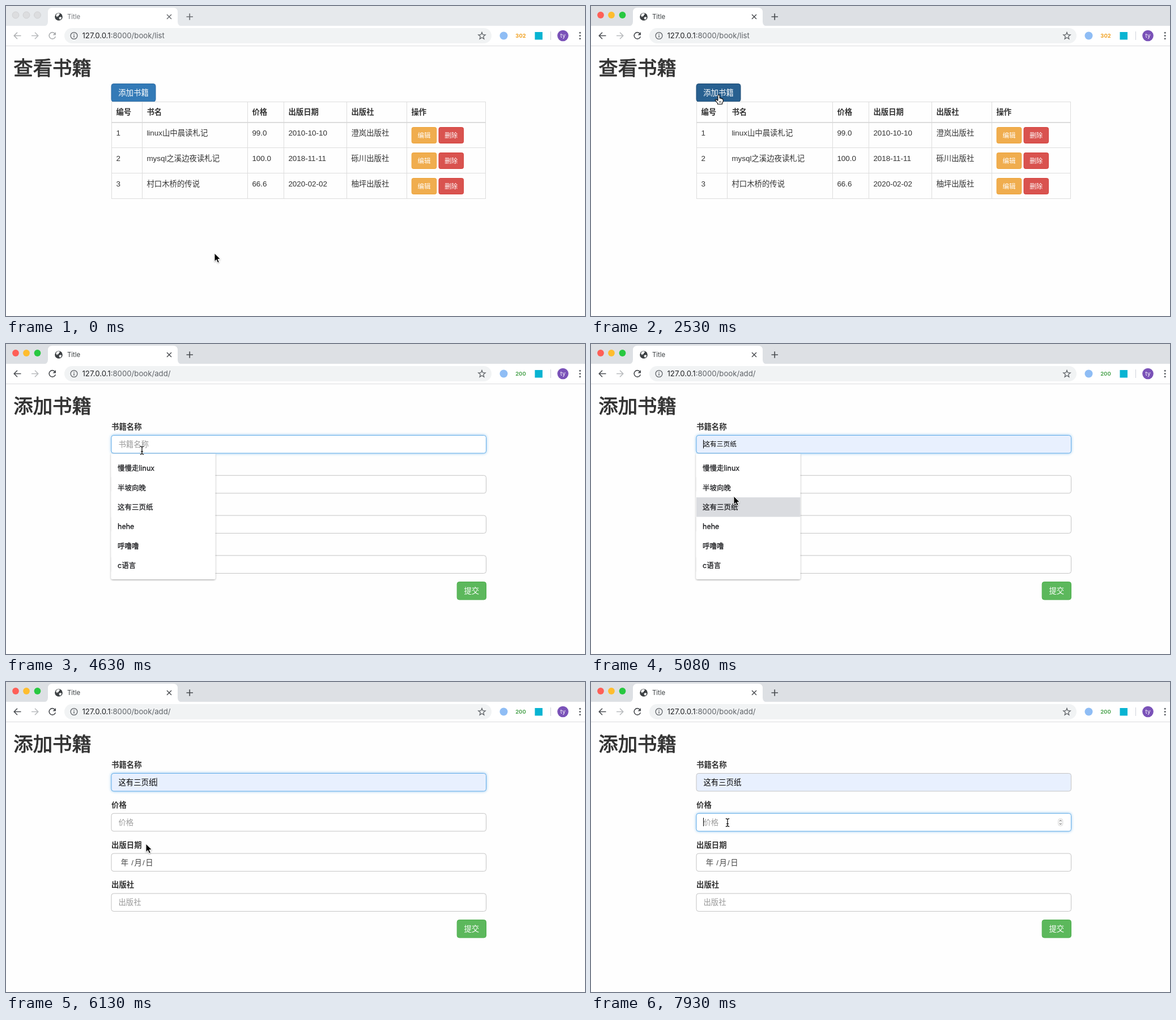
Write an HTML page that moves like this. It is 1022x548 px and loops after 8000 ms.

```html
<!DOCTYPE html>
<html lang="zh">
<head>
<meta charset="utf-8">
<title>Title</title>
<style>
html, body { margin: 0; width: 100%; height: 100%; overflow: hidden; background: #fefefe; }
svg { display: block; width: 100%; height: 100%; }
text { white-space: pre; font-family: "Liberation Sans", "Noto Sans CJK SC", "Noto Sans CJK", sans-serif; }
.ui { font-family: Inter, "Noto Sans CJK SC", "Noto Sans CJK", sans-serif; }
.bold { font-weight: 700; }
.medium { stroke: currentColor; stroke-linejoin: round; }
</style>
</head>
<body>
<svg id="stage" viewBox="0 0 1022 548" preserveAspectRatio="none"></svg>
<script>
const LOOP = 8000;
const BOOK = '这有三页纸';
const OPTIONS = ['慢慢走linux', '半坡向晚', BOOK, 'hehe', '呼噜噜', 'c语言'];
const ROW_H = 34.45, ROW_TOP = 202.2;

// ---- markup helpers ----
const text = (x, cy, str, size = 13.4, fill = '#333', attrs = '') =>
  `<text x="${x}" y="${cy + size * 0.37}" font-size="${size}" fill="${fill}" ${attrs}>${str}</text>`;
const rect = (x, y, w, h, fill, attrs = '') =>
  `<rect x="${x}" y="${y}" width="${w}" height="${h}" fill="${fill}" ${attrs}/>`;
const circle = (x, y, r, fill, attrs = '') =>
  `<circle cx="${x}" cy="${y}" r="${r}" fill="${fill}" ${attrs}/>`;
const line = (d, stroke, w = 1, attrs = '') =>
  `<path d="${d}" fill="none" stroke="${stroke}" stroke-width="${w}" ${attrs}/>`;
const group = (id, body, attrs = '') => `<g id="${id}" ${attrs}>${body}</g>`;
const button = (x, y, w, h, fill, edge, label, size, r, id = '') =>
  rect(x + .5, y + .5, w - 1, h - 1, fill, `stroke="${edge}" rx="${r}" ${id && `id="${id}"`}`) +
  text(x + w / 2, y + h / 2, label, size, '#fff', 'text-anchor="middle"');
const heading = str =>
  text(13.3, 109, str, 34.4, '#333', 'class="medium" color="#333" stroke-width=".95"');

// ---- browser window ----
function chrome() {
  const lights = [17, 36, 55.5].map((x, i) => circle(x, 16, 5.9, '#ddd', `id="light${i}"`)).join('');
  const tab = `<path d="M66 35.5Q74 35.5 74 27.5V11Q74 3 82 3H295Q303 3 303 11V27.5Q303 35.5 311 35.5Z" fill="#fff"/>`;
  const globe = circle(93, 19, 6.8, '#3c4043') +
    `<path d="M88 16q3-4 6-3l1 2-2 1v2h-2l-1 2zM93 21l3-2 2 1q0 3-3 4l-1-2z" fill="#fff"/>`;
  const star = Array.from({ length: 10 }, (_, i) => {
    const a = i * Math.PI / 5 - Math.PI / 2, r = i % 2 ? 2.8 : 6.5;
    return (840 + r * Math.cos(a)).toFixed(2) + ',' + (53 + r * Math.sin(a)).toFixed(2);
  }).join(' ');
  return rect(0, 0, 1022, 36, '#dee1e6', 'id="strip"') + lights + tab + globe +
    text(108, 19, 'Title', 11.4, '#333', 'class="ui" id="tabTitle"') +
    rect(0, 35, 1022, 35, '#fff') + rect(0, 70, 1022, 1, '#dcdcde') +
    group('tools',
      line('M284 15l8 8m0-8l-8 8', 'currentColor', 1.5) +
      line('M318.5 19h11.5M324.2 13.3v11.5', 'currentColor', 1.7) +
      line('M26.5 52.5H14.5M20 46.8l-5.7 5.7 5.7 5.7', 'currentColor', 1.6) +
      line('M86.3 48.8A5.7 5.7 0 1 0 87.3 54', 'currentColor', 1.6) +
      '<path d="M88 46v5.6h-5.6z" fill="currentColor"/>') +
    line('M45 52.5H56.5M51 46.8l5.7 5.7-5.7 5.7', '#b9bbbe', 1.6) +
    rect(103, 39, 754, 27, '#f1f3f4', 'rx="13.5"') +
    circle(120, 52.5, 5.9, 'none', 'stroke="#5f6368" stroke-width="1.3"') +
    line('M120 51.7v4M120 49v1.5', '#5f6368', 1.4) +
    `<text class="ui" x="134.5" y="57.3" font-size="13.2" fill="#5f6368"><tspan fill="#202124">127.0.0.1</tspan>:8000/book/<tspan id="path">list</tspan></text>` +
    `<polygon points="${star}" fill="none" stroke="#5f6368" stroke-width="1.3"/>` +
    circle(878.5, 52.5, 7, '#8fbdf5') +
    text(908.5, 52.5, '302', 9.4, '#f0a020', 'class="ui bold" text-anchor="middle" id="code"') +
    rect(933.5, 46, 13.5, 13.5, '#08b4d2') +
    rect(961, 45, 1, 15, '#cfd3da') +
    circle(983, 52.5, 9.8, '#7a52b8') +
    text(983, 52.2, 'ty', 10, '#fff', 'class="ui" text-anchor="middle"') +
    [47.2, 52.5, 57.8].map(y => circle(1013.2, y, 1.5, '#5f6368')).join('');
}

// ---- book list ----
function listPage() {
  const cols = [186, 240, 426, 490, 601, 707, 846];
  const cells = (row, cy, attrs = '') =>
    row.map((s, i) => text(cols[i] + 8.4, cy, s, 13.4, '#333', attrs)).join('');
  const rows = [
    ['1', 'linux山中晨读札记', '99.0', '2010-10-10', '澄岚出版社'],
    ['2', 'mysql之溪边夜读札记', '100.0', '2018-11-11', '砾川出版社'],
    ['3', '村口木桥的传说', '66.6', '2020-02-02', '柚坪出版社']
  ];
  const body = rows.map((row, i) => {
    const y = 206 + i * 45;
    return cells(row, y + 18.2) +
      button(715.7, y + 8, 44.6, 29, '#f0ad4e', '#eea236', '编辑', 11.5, 3) +
      button(763.5, y + 8, 44.6, 29, '#d9534f', '#d43f3a', '删除', 11.5, 3);
  }).join('');
  return heading('查看书籍') +
    button(185.5, 137, 79, 32.5, '#337ab7', '#2e6da4', '添加书籍', 13.4, 4, 'addBtn') +
    cols.map(x => rect(x, 169, 1, 172, '#ddd')).join('') +
    [169, 250, 295, 340].map(y => rect(186, y, 661, 1, '#ddd')).join('') +
    rect(186, 205, 661, 1.8, '#d9d9d9') +
    cells(['编号', '书名', '价格', '出版日期', '出版社', '操作'], 187.5, 'class="bold"') + body;
}

// ---- add form ----
function formPage() {
  const names = ['书籍名称', '价格', '出版日期', '出版社'];
  const fields = names.map((name, i) => {
    const y = 161 + i * 70.8, cy = y + 16;
    const inner = i === 2
      ? [[202.8, '年'], [221.3, '/'], [226.6, '月'], [241, '/'], [246.3, '日']]
          .map(([x, s]) => text(x, cy, s, 13.4, '#444')).join('')
      : text(198.4, cy, name, 13.4, '#999', `id="hint${i}"`);
    return text(186, y - 15, name, 13.4, '#333', 'class="bold"') +
      rect(186, y + .5, 661.5, 31.5, '#fff', `rx="4" stroke="#c4c4c4" id="box${i}"`) + inner;
  }).join('');
  const options = OPTIONS.map((s, i) =>
    text(197, ROW_TOP + ROW_H * (i + .5), s, 12.5, '#202124',
      'class="ui medium" color="#202124" stroke-width=".3"')).join('');
  return heading('添加书籍') + fields +
    text(198.4, 177, '', 13.4, '#000', 'id="value"') +
    group('spinner', rect(824.5, 241.5, 8.5, 13, '#f4f4f4', 'rx="4" stroke="#d2d2d2" stroke-width=".7"') +
      line('M827 246.2l1.8-2 1.8 2M827 249.8l1.8 2 1.8-2', '#555', 1)) +
    rect(198, 169.5, 1, 15, '#000', 'id="caret"') +
    button(795.7, 420, 52.3, 32.5, '#5cb85c', '#4cae4c', '提交', 13.4, 4) +
    group('menu',
      `<path d="M185.5 194H369.5V413q0 3-3 3H188.5q-3 0-3-3Z" fill="#fff" filter="url(#drop)"/>` +
      rect(186, 0, 183.5, ROW_H, '#dadce0', 'id="pick"') + options);
}

const cursors =
  group('arrow', `<path d="M0 0V14.6L3.4 11.5 5.7 17 8.3 15.9 6 10.6H10.6Z" fill="#000" stroke="#fff" stroke-width="1" stroke-linejoin="round"/>`, 'filter="url(#soft)"') +
  group('hand', `<path d="M-1.6 1.3Q0-1.3 1.6 1.3V6q1.6-1 2.3.5 1.6-.6 2 .9 1.8-.3 1.8 1.5V12L6 14.5v2H-2V15L-6 9.8q-.5-2.2 1.6-1.6L-1.6 10.2Z" fill="#fff" stroke="#000" stroke-width="1.1" stroke-linejoin="round"/>` +
    line('M1.3 11v3M3.5 11v3', '#000', .8)) +
  group('beam', [['#fff', 2.8], ['#111', 1.3]].map(([c, w]) =>
    line('M-3.2-7Q-.8-7 0-5.5 .8-7 3.2-7M0-5.5V5.5M-3.2 7Q-.8 7 0 5.5 .8 7 3.2 7M-2 2.2H2', c, w)).join(''));

const stage = document.getElementById('stage');
stage.innerHTML = `<defs>
  <filter id="drop" x="-10%" y="-10%" width="120%" height="120%"><feDropShadow dx="0" dy="1" stdDeviation="1.6" flood-opacity=".38"/></filter>
  <filter id="soft" x="-50%" y="-50%" width="200%" height="200%"><feDropShadow dx="0" dy="1" stdDeviation=".8" flood-opacity=".35"/></filter>
  </defs>` + rect(0, 0, 1022, 548, '#fefefe') + chrome() +
  group('list', listPage()) + group('form', formPage()) +
  group('status', rect(-4, 537.5, 151, 24, '#f8f8f9', 'rx="3" stroke="#c8c8ca" filter="url(#soft)"') +
    text(4, 547.3, '127.0.0.1:8000/book/add/', 11.3, '#5f6368', 'class="ui"')) + cursors;

const el = id => document.getElementById(id);
const set = (id, name, v) => el(id).setAttribute(name, v);
const show = (id, on) => set(id, 'visibility', on ? 'visible' : 'hidden');

// ---- timeline ----
// [time, x, y] of the pointer
const PATH = [
  [0, 368, 437], [1190, 188.5, 192], [1930, 225.5, 157], [3130, 225.5, 157],
  [3280, 230, 149], [4030, 240, 188], [4630, 240, 188], [5080, 252, 269],
  [5530, 246.5, 295], [5830, 246.5, 295], [6130, 247, 286], [6580, 241, 248.5], [LOOP, 241, 248.5]
];

function pointer(t) {
  let i = 1;
  while (t > PATH[i][0]) i++;
  const [t0, x0, y0] = PATH[i - 1], [t1, x1, y1] = PATH[i];
  const p = (t - t0) / (t1 - t0);
  const e = i === 1 ? p * p * (3 - 2 * p) : p;
  return [x0 + (x1 - x0) * e, y0 + (y1 - y0) * e];
}

const tickTime = k => k * 150 - (k >= 7 ? 10 : 0) - (k >= 12 ? 10 : 0);
function tick(t) {
  let k = Math.floor((t + 20) / 150);
  if (tickTime(k) > t) k--;
  return tickTime(k);
}

const within = (t, a, b) => t >= a && t < b;

function draw(now) {
  const t = tick(now);
  const [x, y] = pointer(t);
  const active = t >= 2230, form = t >= 3130;

  // window state
  ['#ff5f57', '#ffbd2e', '#28c840'].forEach((c, i) => {
    set('light' + i, 'fill', active ? c : '#dcdddf');
    set('light' + i, 'stroke', active ? 'none' : '#d0d1d3');
  });
  set('strip', 'fill', active ? '#dde0e4' : '#e6e9ec');
  set('tabTitle', 'fill', active ? '#3c4043' : '#777a7e');
  el('tools').style.color = active ? '#4a4d51' : '#6c6f73';
  document.querySelectorAll('#tools path').forEach((p, i) =>
    p.setAttribute('opacity', !active && i > 1 ? .55 : 1));
  el('path').textContent = form ? 'add/' : 'list';
  el('code').textContent = form ? '200' : '302';
  set('code', 'fill', form ? '#4fa552' : '#f0a020');
  show('list', !form);
  show('form', form);
  show('status', within(t, 2680, 3430));
  set('addBtn', 'fill', active ? '#286090' : '#337ab7');
  set('addBtn', 'stroke', active ? '#204d74' : '#2e6da4');

  // suggestions
  const menu = within(t, 4330, 5680);
  const row = menu ? Math.floor((y + 3 - ROW_TOP) / ROW_H) : -1;
  show('menu', menu);
  show('pick', row >= 0);
  set('pick', 'y', ROW_TOP + ROW_H * Math.max(row, 0));

  // first field
  const chosen = t >= 5680, size = chosen ? 13.4 : 11.7;
  const value = chosen ? BOOK : row >= 0 ? OPTIONS[row] : '';
  el('value').textContent = value;
  set('value', 'font-size', size);
  set('value', 'y', 177 + size * .37);
  show('value', form);
  show('hint0', form && !value);
  set('box0', 'fill', value ? '#e8f0fe' : '#fff');

  // focus ring
  const focus = within(t, 4180, 6730) ? 0 : t >= 6730 ? 1 : -1;
  const since = t - (focus ? 6730 : 4180);
  const glow = since < 100 ? .5 : 1;
  [0, 1].forEach(i => {
    const on = focus === i;
    set('box' + i, 'stroke', on ? '#66afe9' : '#c4c4c4');
    el('box' + i).style.filter = on ? `drop-shadow(0 0 2.6px rgba(102,175,233,${.75 * glow}))` : 'none';
  });

  // caret and stepper
  const caret = within(t, 4180, 4630) || within(t, 5080, 5530) ||
    within(t, 5680, 6180) || within(t, 6730, 7480) || t >= 7930;
  show('caret', caret);
  set('caret', 'x', focus === 0 && chosen ? 265.5 : 198);
  set('caret', 'y', focus === 1 ? 240 : 169.5);
  const overPrice = t >= 5680 && within(y, 232, 264);
  show('spinner', overPrice || focus === 1);

  // pointer shape
  const shape = within(t, 2230, 3130) ? 'hand'
    : overPrice || (form && within(y, 161, 194)) ? 'beam' : 'arrow';
  ['arrow', 'hand', 'beam'].forEach(s => show(s, s === shape));
  set(shape, 'transform', `translate(${x} ${y})`);
}

const start = performance.now();
function loop() {
  draw((performance.now() - start) % LOOP);
  requestAnimationFrame(loop);
}
loop();
</script>
</body>
</html>
```
